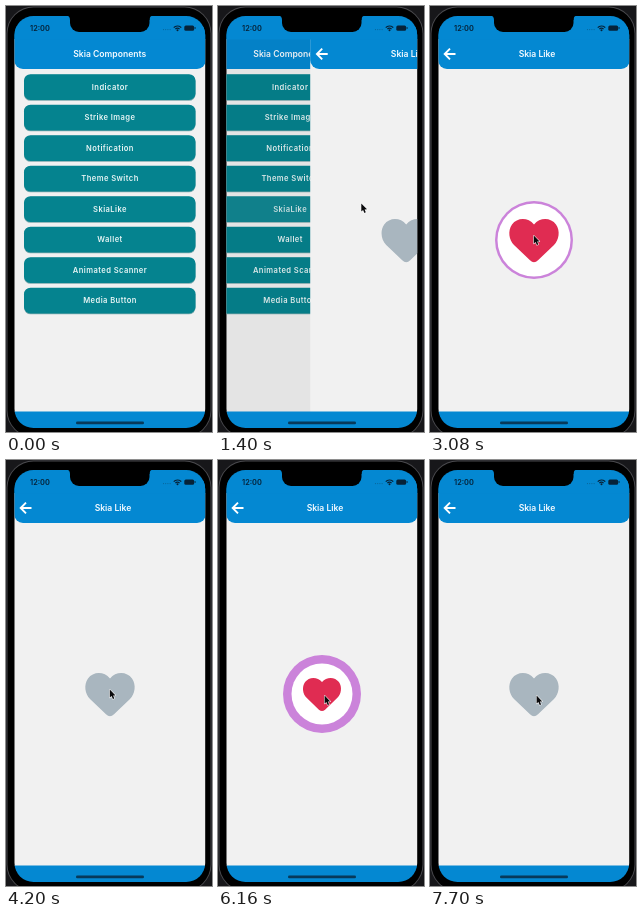
Animation of 206 by 426 pixels, one loop 8000 ms. Source, as an HTML page with a canvas:

```html
<!DOCTYPE html>
<html lang="en">
<head>
<meta charset="utf-8">
<title>Skia Components</title>
<style>
  html, body { margin: 0; width: 100%; height: 100%; overflow: hidden; background: #17171a; }
  canvas { display: block; width: 206px; height: 426px; }
</style>
</head>
<body>
<canvas id="stage"></canvas>
<script>
const W = 206, H = 426, LOOP = 8000, STEP = 140;
const BLUE = '#0488d2', PAGE = '#f1f1f1', TEAL = '#05838f', PURPLE = '#cb83da';
const GREY = [169, 182, 191], RED = [224, 44, 82];
const ITEMS = ['Indicator', 'Strike Image', 'Notification', 'Theme Switch',
  'SkiaLike', 'Wallet', 'Animated Scanner', 'Media Button'];
const CX = 104, CY = 234;

const canvas = document.getElementById('stage');
const dpr = window.devicePixelRatio || 1;
canvas.width = W * dpr;
canvas.height = H * dpr;
const c = canvas.getContext('2d');

const clamp = x => Math.max(0, Math.min(1, x));
const span = (t, a, b) => clamp((t - a) / (b - a));
const lerp = (a, b, k) => a + (b - a) * k;
const smooth = k => k * k * (3 - 2 * k);
const mix = (a, b, k) => `rgb(${a.map((v, i) => Math.round(lerp(v, b[i], k)))})`;

function box(x, y, w, h, r, fill) {
  c.beginPath();
  c.roundRect(x, y, w, h, r);
  c.fillStyle = fill;
  c.fill();
}

function disc(x, y, r, fill) {
  c.beginPath();
  c.arc(x, y, r, 0, Math.PI * 2);
  c.fillStyle = fill;
  c.fill();
}

function text(str, x, y, size, color, spacing = 0, align = 'center') {
  c.font = `600 ${size}px Inter, "Liberation Sans", sans-serif`;
  c.letterSpacing = spacing + 'px';
  c.textAlign = align;
  c.textBaseline = 'alphabetic';
  c.fillStyle = color;
  c.fillText(str, x, y);
  c.letterSpacing = '0px';
}

function page(title, titleX) {
  box(8, 33, 192, 373, 0, PAGE);
  box(8, 20, 192, 43, [0, 0, 9, 9], BLUE);
  text(title, titleX, 51.2, 8.6, '#f4faff');
}

function menu(pressed) {
  page('Skia Components', 103.7);
  ITEMS.forEach((label, i) => {
    const y = 68.2 + i * 30.5;
    c.globalAlpha = pressed && i === 4 ? 0.9 : 1;
    box(18, y + 0.6, 171.5, 26, 6.5, '#7aa9ad');
    box(18, y, 171.5, 25.8, 6.5, TEAL);
    text(label, 104, y + 15.6, 7.6, '#e8f5f5', 0.42);
    c.globalAlpha = 1;
  });
}

function heart(scale, color) {
  if (scale <= 0) return;
  c.save();
  c.translate(CX, CY);
  c.scale(scale, scale);
  c.beginPath();
  c.moveTo(0, -15.5);
  for (const s of [-1, 1]) {
    const pts = s < 0
      ? [[-6, -23, -17, -22.5, -22, -15.5], [-26.5, -9, -25, 0, -20, 5]]
      : [[25, 0, 26.5, -9, 22, -15.5], [17, -22.5, 6, -23, 0, -15.5]];
    if (s > 0) {
      c.lineTo(-4, 20.3);
      c.quadraticCurveTo(0, 24, 4, 20.3);
      c.lineTo(20, 5);
    }
    pts.forEach(p => c.bezierCurveTo(...p));
  }
  c.fillStyle = color;
  c.fill();
  c.restore();
}

// Like burst; u is the time since the tap
function burst(u) {
  const R = 39 * span(u, 90, 260);
  const hole = u < 280 ? 30.5 * span(u, 190, 280) : 30.5 + (u - 280) * 0.043;
  if (hole < R) disc(CX, CY, R, PURPLE);
  c.globalAlpha = 1 - span(u, 480, 800);
  disc(CX, CY, Math.min(hole, R), '#fff');
  c.globalAlpha = 1;

  const k = span(u, 430, 830);
  if (k > 0 && k < 1) {
    for (let i = 0; i < 8; i++) {
      const a = i * Math.PI / 4 - Math.PI / 2, r = lerp(40, 45, k);
      disc(CX + r * Math.cos(a), CY + r * Math.sin(a), 2 * (1 - k), PURPLE);
    }
  }
  if (u < 110) heart(1 - span(u, 0, 110), mix(GREY, RED, 0));
  else heart(u < 280 ? 0.77 * span(u, 110, 280) : lerp(0.77, 1, span(u, 280, 420)), mix(GREY, RED, 1));
}

function likePage(t) {
  page('Skia Like', 107);
  c.strokeStyle = '#fff';
  c.lineWidth = 1.9;
  c.lineJoin = 'miter';
  c.beginPath();
  c.moveTo(25.5, 48);
  c.lineTo(15, 48);
  c.moveTo(20, 42.7);
  c.lineTo(14.7, 48);
  c.lineTo(20, 53.3);
  c.stroke();

  const round = [[2660, 3920], [5880, 7420]].find(([on, off]) => t >= on && t < off + 280);
  if (!round) heart(1, mix(GREY, RED, 0));
  else if (t <= round[1]) burst(t - round[0]);
  else heart(1, mix(RED, GREY, span(t, round[1], round[1] + 280)));
}

function statusBar() {
  const ink = '#062238';
  box(8, 10, 192, 23.5, 0, BLUE);
  text('12:00', 24, 24.8, 7.4, ink, 0, 'left');
  for (let i = 0; i < 4; i++) disc(157.5 + i * 2.2, 23.6, 0.6, '#07659b');
  c.strokeStyle = ink;
  c.lineWidth = 1.2;
  for (const r of [2.8, 5]) {
    c.beginPath();
    c.arc(171.5, 25, r, -Math.PI * 0.77, -Math.PI * 0.23);
    c.stroke();
  }
  disc(171.5, 24.2, 1, ink);
  box(178.3, 19.5, 9.8, 5.2, 1.5, ink);
  box(188.6, 21.1, 0.9, 2, 0.4, ink);
}

function cursor(t) {
  if (t < STEP) return;
  const path = [[140, -4, 4], [980, 143.3, 197.5], [1400, 143.3, 197.5], [2240, 103.8, 229.6],
    [5040, 103.8, 229.6], [5740, 106.6, 235.6], [LOOP, 106.6, 235.6]];
  const i = path.findIndex(p => t <= p[0]);
  const a = path[Math.max(0, i - 1)], b = path[i];
  const k = a === b ? 0 : smooth(span(t, a[0], b[0]));
  c.save();
  c.translate(lerp(a[1], b[1], k), lerp(a[2], b[2], k));
  c.beginPath();
  [[0, 0], [0, 8], [1.8, 6.4], [3.1, 9.4], [4.5, 8.8], [3.3, 5.9], [5.7, 5.8]]
    .forEach(p => c.lineTo(...p));
  c.closePath();
  c.lineJoin = 'round';
  c.lineWidth = 1.2;
  c.strokeStyle = 'rgba(255,255,255,.85)';
  c.stroke();
  c.fillStyle = '#0a0a0c';
  c.fill();
  c.restore();
}

function draw(t) {
  c.setTransform(dpr, 0, 0, dpr, 0, 0);
  box(0, 0, W, H, 0, '#17171a');
  box(0.5, 0.5, 205, 431, 27, '#4a4a4e');
  box(1.5, 1.5, 203, 429, 26, '#000');

  c.save();
  c.beginPath();
  c.roundRect(8.5, 10, 190.7, 412, 19);
  c.clip();

  const a = Math.max(0, (t - 1220) / 96);
  const push = 1 - (1 + a) * Math.exp(-a);
  if (push < 0.999) {
    c.save();
    c.translate(-57 * push, 0);
    menu(t >= 1120);
    c.restore();
    box(8, 33, 192, 373, 0, `rgba(0,0,0,${0.1 * push})`);
  }
  if (push > 0) {
    c.save();
    c.translate(191 * (1 - push), 0);
    likePage(t);
    c.restore();
  }
  statusBar();
  box(8, 405.5, 192, 18, 0, BLUE);
  box(70, 415.6, 68, 2.6, 1.3, '#07395a');
  c.restore();

  // Notch
  box(64, 8, 79.5, 18, [0, 0, 9, 9], '#000');
  c.beginPath();
  c.moveTo(60.5, 9.5);
  c.quadraticCurveTo(64, 9.8, 64, 14);
  c.lineTo(143.5, 14);
  c.quadraticCurveTo(143.5, 9.8, 147, 9.5);
  c.fillStyle = '#000';
  c.fill();

  cursor(t);
}

const start = performance.now();
function tick() {
  const t = (performance.now() - start) % LOOP;
  draw(Math.min(7700, Math.floor(t / STEP) * STEP));
  requestAnimationFrame(tick);
}
tick();
</script>
</body>
</html>
```
